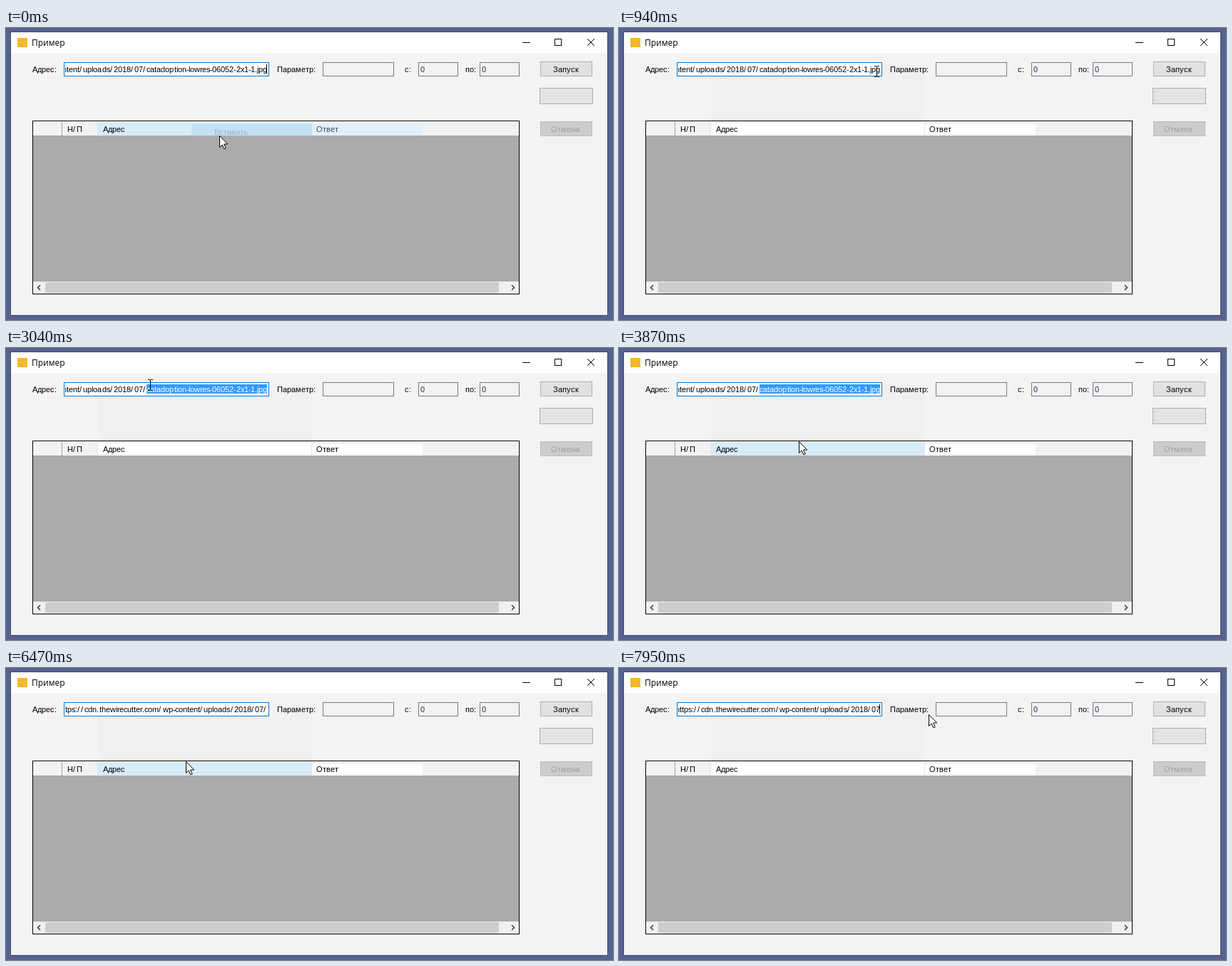
An HTML page with a canvas for the animation above (8000 ms loop, 851x410 px).

```html
<!DOCTYPE html>
<html lang="ru">
<head>
<meta charset="utf-8">
<style>
html, body { margin: 0; width: 100%; height: 100%; overflow: hidden; }
canvas { display: block; }
</style>
</head>
<body>
<canvas id="stage" width="851" height="410"></canvas>
<script>
const ctx = document.getElementById('stage').getContext('2d');
const LOOP = 8000;
const FONT = '"Liberation Sans", sans-serif';
const FOLDER = 'https://cdn.thewirecutter.com/wp-content/uploads/2018/07';
const FILE = 'catadoption-lowres-06052-2x1-1.jpg';
const FILE_START = FOLDER.length + 1;
const GHOST = '#f0f0f0';

// Pointer samples: start time, shape, x, y
const POINTER = [
  [0, 'arrow', 299, 151], [270, 'arrow', 310, 137], [400, 'arrow', 330, 104],
  [520, 'arrow', 349, 74], [670, 'beam', 359, 61], [940, 'beam', 361, 61],
  [1080, 'beam', 364, 60], [1200, 'beam', 364, 59], [1360, 'beam', 365, 60],
  [1870, 'beam', 350, 60], [2000, 'beam', 322, 59], [2120, 'beam', 292, 58],
  [2270, 'beam', 257, 58], [2400, 'beam', 246, 56], [2520, 'beam', 232, 54],
  [2650, 'beam', 220, 53], [2770, 'beam', 211, 52], [2920, 'beam', 206, 52],
  [3040, 'beam', 202, 52], [3600, 'arrow', 225, 72], [3720, 'arrow', 246, 107],
  [3870, 'arrow', 252, 131], [7550, 'arrow', 284, 88], [7670, 'arrow', 317, 45],
  [7810, 'arrow', 360, 47], [7950, 'arrow', 434, 65]
];
const CARET_ON = [[0, 400], [1080, 1870], [4970, 5520], [6050, 6470], [6740, 7280], [7550, LOOP]];

const within = (t, from, to) => t >= from && t < to;

function rect(x, y, w, h, fill) {
  ctx.fillStyle = fill;
  ctx.fillRect(x, y, w, h);
}

function box(x, y, w, h, fill, border) {
  rect(x, y, w, h, border);
  rect(x + 1, y + 1, w - 2, h - 2, fill);
}

function line(color, ...points) {
  ctx.strokeStyle = color;
  ctx.lineWidth = 1;
  ctx.beginPath();
  points.forEach(([x, y]) => ctx.lineTo(x, y));
  ctx.stroke();
}

// Whole-pixel advances, as in classic screen fonts
const advances = {};
function advance(ch) {
  if (!(ch in advances)) {
    ctx.font = `1100px ${FONT}`;
    const w = ctx.measureText(ch).width / 100;
    advances[ch] = ch === '/' ? 5.055 : ch < '\u0400' ? Math.round(w - 0.2) + 0.055 : Math.round(w);
  }
  return advances[ch];
}

const textWidth = str => [...str].reduce((sum, ch) => sum + advance(ch), 0);

function text(str, x, y, color = '#000') {
  for (const ch of str) {
    const step = advance(ch);
    ctx.font = `11px ${FONT}`;
    ctx.fillStyle = color;
    ctx.fillText(ch, Math.round(x), y);
    x += step;
  }
}

function drawWindow() {
  rect(0, 0, 851, 410, '#56638f');
  box(6, 5, 838, 399, '#f3f3f3', '#414b70');
  rect(7, 6, 836, 29, '#fff');
  rect(16, 14, 14, 13, '#f4b92a');
  ctx.font = '12px "Open Sans", "Noto Sans", sans-serif';
  ctx.fillStyle = '#000';
  ctx.fillText('Пример', 36, 25);
  line('#000', [724, 20.5], [735, 20.5]);
  ctx.strokeRect(769.5, 15.5, 9, 9);
  line('#000', [815, 15], [825, 25]);
  line('#000', [825, 15], [815, 25]);
}

function drawGhost(t) {
  if (t >= 400) rect(129, 52, 300, 79, GHOST);
  if (t >= 7670) rect(370, 47, t >= 7950 ? 74 : 59, 37, GHOST);
}

function drawControls() {
  text('Адрес:', 37, 62);
  text('Параметр:', 380, 62);
  text('с:', 559, 62);
  text('по:', 644, 62);
  for (const [x, w] of [[444, 100], [578, 56], [664, 56]]) box(x, 48, w, 20, '#f2f2f2', '#7a7a7a');
  text('0', 581, 62, '#17365f');
  text('0', 667, 62, '#17365f');
  box(749, 47, 73, 21, '#e1e1e1', '#adadad');
  text('Запуск', 767, 62, '#000020');
  box(748, 84, 75, 23, '#e3e3e3', '#adadad');
  box(749, 131, 73, 21, '#cccccc', '#bcbcbc');
  text('Отмена', 764, 146, '#a0a0a0');
}

function drawGrid(t) {
  box(37, 130, 683, 244, '#aaabaa', '#000');
  rect(38, 131, 681, 20, '#f2f2f2');
  rect(38, 131, 681, 1, '#fff');
  const hot = t < 400 || within(t, 3870, 7550);
  if (hot) rect(128, 132, 301, 19, '#d7ebf8');
  else rect(129, 133, 299, 18, '#fff');
  rect(429, 135, 155, 16, t < 130 ? '#e0effc' : '#fff');
  rect(78, 132, 1, 19, '#a0a0a0');
  if (!hot) {
    rect(128, 132, 1, 19, '#e5e5e5');
    rect(428, 132, 1, 19, '#e5e5e5');
  }
  rect(38, 151, 41, 1, '#a0a0a0');
  if (t < 130) {
    rect(260, 135, 169, 16, '#c4e0f5');
    text('Вставить', 292, 150, '#9fb1bf');
  }
  text('Н/П', 86, 146);
  text('Адрес', 136, 146);
  text('Ответ', 435, 146, t < 130 ? '#444c55' : '#000');

  rect(38, 356, 681, 17, '#f0f0f0');
  rect(55, 357, 636, 15, '#cdcdcd');
  for (const [x, dir] of [[44, 1], [713, -1]]) {
    ctx.strokeStyle = '#404040';
    ctx.lineWidth = 1.6;
    ctx.beginPath();
    ctx.moveTo(x + 4 * dir, 361);
    ctx.lineTo(x + 0.5 * dir, 364.5);
    ctx.lineTo(x + 4 * dir, 368);
    ctx.stroke();
  }
}

function selectionStart(str, left, pointerX) {
  let i = 0;
  for (let x = left; i < str.length && x + advance(str[i]) <= pointerX; i++) x += advance(str[i]);
  return i;
}

function drawAddress(t, pointerX) {
  const value = t < 4970 ? `${FOLDER}/${FILE}` : t < 6740 ? FOLDER + '/' : FOLDER;
  const left = 366 - textWidth(value);
  box(81, 48, 288, 20, '#fff', '#0078d7');
  ctx.save();
  ctx.beginPath();
  ctx.rect(83, 50, 284, 17);
  ctx.clip();
  text(value, left, 62);
  if (within(t, 1870, 4970)) {
    const start = t < 3040 ? selectionStart(value, left, pointerX) : FILE_START;
    const x = left + textWidth(value.slice(0, start));
    rect(Math.round(x), 51, 366 - Math.round(x), 13, '#3399ff');
    text(value.slice(start), x, 62, '#fff');
  }
  if (CARET_ON.some(([from, to]) => within(t, from, to))) rect(365, 51, 1, 13, '#000');
  ctx.restore();
}

function drawPointer(shape, x, y) {
  if (shape === 'beam') {
    rect(x, y - 7, 1, 14, '#000');
    for (const edge of [y - 8, y + 7]) {
      rect(x - 3, edge, 3, 1, '#000');
      rect(x + 1, edge, 3, 1, '#000');
    }
    return;
  }
  ctx.save();
  ctx.translate(x + 0.5, y + 0.5);
  ctx.beginPath();
  for (const [px, py] of [[0, 0], [0, 16], [3.7, 12.5], [6.3, 18.3], [8.7, 17.3], [6.2, 11.5], [11.2, 11.5]]) ctx.lineTo(px, py);
  ctx.closePath();
  ctx.fillStyle = '#fff';
  ctx.fill();
  ctx.strokeStyle = '#000';
  ctx.lineWidth = 1;
  ctx.stroke();
  ctx.restore();
}

function draw(t) {
  const [, shape, x, y] = POINTER.findLast(([start]) => start <= t);
  drawWindow();
  drawGhost(t);
  drawControls();
  drawGrid(t);
  drawAddress(t, x);
  drawPointer(shape, x, y);
}

function tick() {
  draw(performance.now() % LOOP);
  requestAnimationFrame(tick);
}
tick();
</script>
</body>
</html>
```
